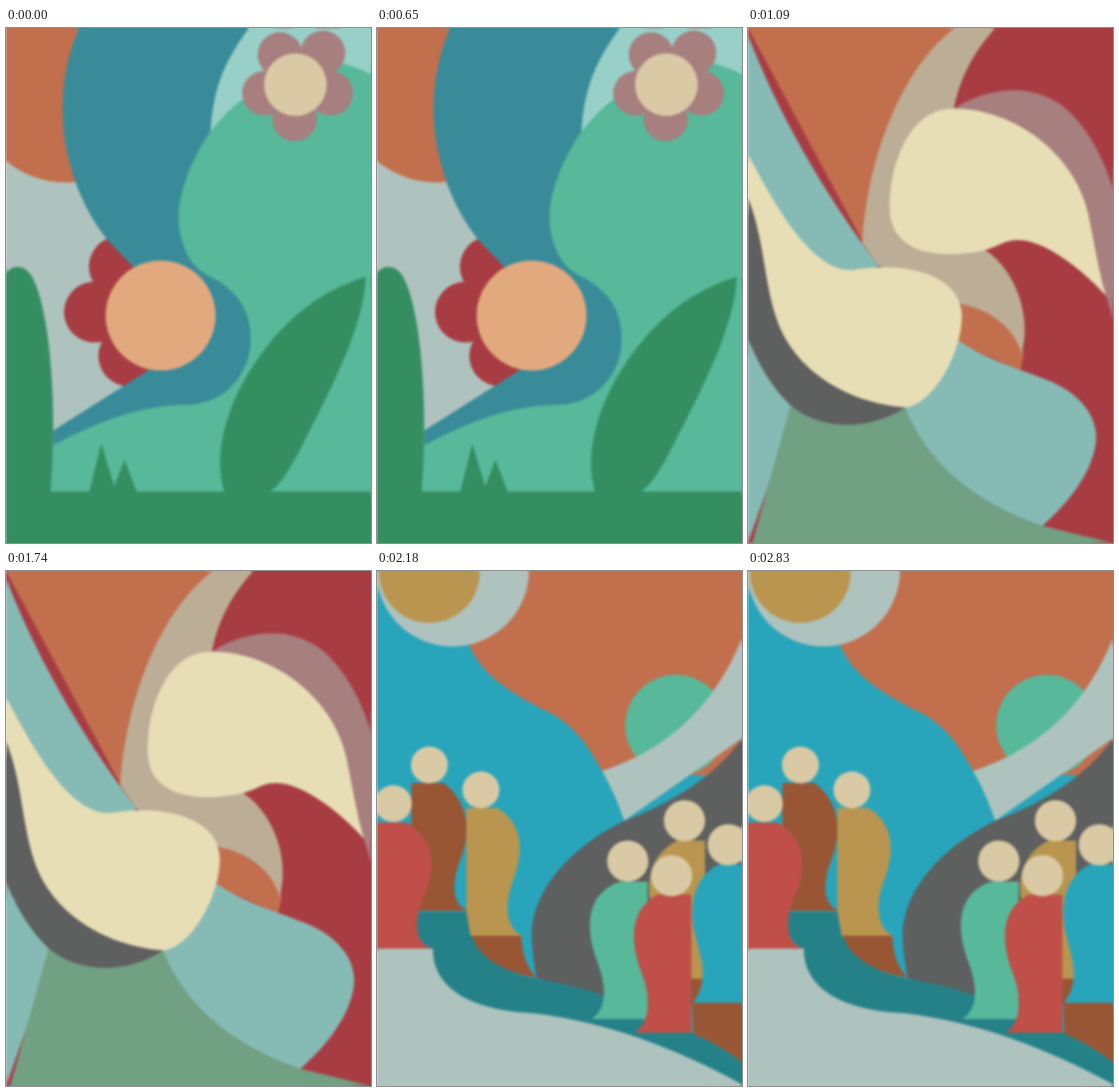
These frames come from a looping animation (425 by 600 pixels, 3270 ms). An HTML page with a canvas:

```html
<!DOCTYPE html>
<html lang="en">
<head>
<meta charset="utf-8">
<title>Abstract landscapes</title>
<style>
html, body { margin: 0; width: 100%; height: 100%; overflow: hidden; }
canvas { display: block; }
</style>
</head>
<body>
<canvas id="stage" width="425" height="600"></canvas>
<script>
const W = 425, H = 600, PAD = 8, HOLD = 1090;
const stage = document.getElementById('stage').getContext('2d');

const color = {
  orange: '#c26f4e', teal: '#3a8b99', mint: '#57b99a', leaf: '#358e60',
  mist: '#aec3be', ice: '#98d0c8', mauve: '#a67f7e', sand: '#d9caa5',
  crimson: '#a83c43', peach: '#e2a97e', tan: '#bcae96', aqua: '#86bab5',
  cream: '#e7deb5', gray: '#5e5f5f', sage: '#71a083', sky: '#28a5ba',
  gold: '#b9954f', brown: '#985635', red: '#bf4f48', road: '#258188'
};

function makeCanvas(w, h) {
  const canvas = document.createElement('canvas');
  canvas.width = w;
  canvas.height = h;
  return canvas;
}

function painter(ctx) {
  return {
    fill(name) {
      ctx.fillStyle = color[name];
      ctx.fillRect(0, 0, W, H);
    },
    shape(name, d) {
      ctx.fillStyle = color[name];
      ctx.fill(new Path2D(d));
    },
    dots(name, r, ...centers) {
      ctx.fillStyle = color[name];
      for (const [x, y] of centers) {
        ctx.beginPath();
        ctx.arc(x, y, r, 0, Math.PI * 2);
        ctx.fill();
      }
    }
  };
}

function garden({ fill, shape, dots }) {
  fill('mist');
  dots('orange', 110, [70, 70]);
  dots('crimson', 35.5, [132, 278], [103, 331], [143, 382]);
  shape('mint', 'M0 505 L55 486 L200 400 L425 400 V600 H0Z');
  shape('teal', `M85 0 C65 45 59 105 75 160 C84 195 100 224 118 247 L147 277
    L180 335 L167 398 L55 469 V486 L200 480 L425 300 V0Z`);
  shape('ice', 'M283 0 C258 34 241 65 238 122 L425 150 V0Z');
  shape('mint', `M238 121 C252 103 264 91 276 83 C310 42 365 22 425 54 V600 H0 V505
    L55 486 C105 460 155 439 212 439 C255 438 285 403 285 362
    C285 328 268 304 235 288 C210 276 201 244 201 218 C202 184 222 143 238 121Z`);
  dots('mauve', 26, [319, 31], [369, 29], [301, 76], [378, 76], [336, 106]);
  dots('sand', 36.5, [337, 66]);
  dots('peach', 64, [180, 335]);
  shape('leaf', `M0 286 C6 277 18 275 27 285 C49 312 61 430 52 540 H97 L111 484
    L126 534 L138 503 L152 540 H254 C242 500 253 445 290 390
    C326 336 371 304 419 290 C416 350 379 419 345 486 C331 513 321 530 308 540
    H425 V600 H0Z`);
}

function swirls({ fill, shape }) {
  fill('crimson');
  shape('orange', 'M0 0 H242 L134 250 Z M249 321 C290 329 315 352 321 380 L317 399 L240 365Z');
  shape('tan', `M241 0 H288 C265 25 247 56 240 93 L275 258 C304 276 325 318 322 360
    L319 380 C309 346 278 327 249 322 L152 277 L133 250 C139 150 180 45 241 0Z`);
  shape('aqua', 'M0 8 C33 95 85 188 152 277 L122 300 L0 250Z');
  shape('mauve', `M240 94 C285 65 346 62 383 107 C404 132 417 160 425 188
    V340 L417 312 L300 180Z`);
  shape('cream', `M240 94 C310 94 380 146 396 216 C403 249 408 283 417 312
    C390 282 345 246 313 247 C298 247 289 256 275 259 C225 270 165 264 165 210
    C165 153 191 92 240 94Z`);
  shape('aqua', 'M0 350 L60 430 L0 600Z');
  shape('sage', 'M50 438 L5 600 H425 L343 580 L185 430Z');
  shape('aqua', `M245 364 C275 385 310 395 340 407 C385 422 409 452 405 484
    C399 525 365 560 343 580 C270 555 209 510 183 442Z`);
  shape('gray', `M0 190 L183 442 C145 468 87 471 50 440 C29 421 11 390 0 362Z`);
  shape('cream', `M0 147 C30 204 74 285 122 282 C184 271 249 288 249 335
    C249 381 214 440 183 442 C116 437 53 399 33 338 C18 293 19 245 0 198Z`);
}

function villagers({ fill, shape, dots }) {
  fill('sky');
  shape('orange', `M108 88 C124 124 158 142 190 160 C228 175 247 205 262 233
    L425 240 V0 H100Z`);
  dots('mist', 89, [88, -1]);
  dots('gold', 58.5, [61, 2]);
  dots('mint', 59, [348, 180]);
  shape('mist', `M262 233 C342 207 395 153 425 78 V195 L288 291
    C281 271 273 252 262 233Z`);
  shape('gray', `M425 195 C397 235 350 268 288 291 C222 323 180 375 180 425
    Q181 453 186 474 L280 505 H425Z`);
  shape('road', `M47 397 H108 C112 441 141 468 186 475 C224 482 244 487 265 495
    L368 539 Q397 551 425 572 V600 H65 V440 C49 435 42 415 47 397Z`);
  shape('mist', `M0 440 H65 C65 490 116 512 180 515 C267 525 348 556 425 598
    V600 H0Z`);
  shape('brown', 'M110 424 H168 C169 447 175 463 186 474 C148 468 117 449 110 424Z');
  shape('brown', `M40 247 H78 C104 267 111 300 98 334 C84 369 90 391 107 396
    H47 L40 340Z`);
  shape('red', `M0 293 H35 C67 312 69 347 55 378 C42 407 43 434 65 440 H0Z`);
  shape('gold', `M104 276 H140 C169 294 172 325 158 362 C146 394 153 419 170 425
    H109 L104 396Z`);
  dots('sand', 21.5, [61, 226], [19, 271], [121, 255]);

  shape('gold', 'M350 314 H382 V475 H330 L317 375 C315 345 329 324 350 314Z');
  shape('brown', 'M366 475 H385 V503 H425 V572 Q397 551 368 539Z');
  shape('sky', `M425 342 H398 C372 355 363 383 369 418 C376 449 389 476 368 503 H425Z`);
  shape('mint', `M283 362 H315 V522 H250 C269 509 267 483 256 454
    C239 407 249 373 283 362Z`);
  shape('red', `M327 377 H366 V538 H300 C319 525 319 496 308 468
    C291 423 299 391 327 377Z`);
  dots('sand', 24, [292, 338], [358, 291], [343, 355], [409, 319]);
}

// Softens the scene, extending its borders so the edges stay opaque.
function render(scene) {
  const sharp = makeCanvas(W, H);
  scene(painter(sharp.getContext('2d')));

  const padded = makeCanvas(W + 2 * PAD, H + 2 * PAD);
  const pad = padded.getContext('2d');
  pad.drawImage(sharp, 0, 0, padded.width, padded.height);
  pad.drawImage(sharp, PAD, PAD);

  const soft = makeCanvas(W, H);
  const ctx = soft.getContext('2d');
  ctx.filter = 'blur(1.6px)';
  ctx.drawImage(padded, -PAD, -PAD);
  ctx.filter = 'none';
  ctx.fillStyle = 'rgba(255, 255, 255, 0.3)';
  ctx.fillRect(0, 0, 1, H);
  return soft;
}

const scenes = [garden, swirls, villagers].map(render);
let start;

function draw(now) {
  start ??= now;
  const index = Math.floor((now - start) / HOLD) % scenes.length;
  stage.drawImage(scenes[index], 0, 0);
  requestAnimationFrame(draw);
}
stage.drawImage(scenes[0], 0, 0);
requestAnimationFrame(draw);
</script>
</body>
</html>
```
